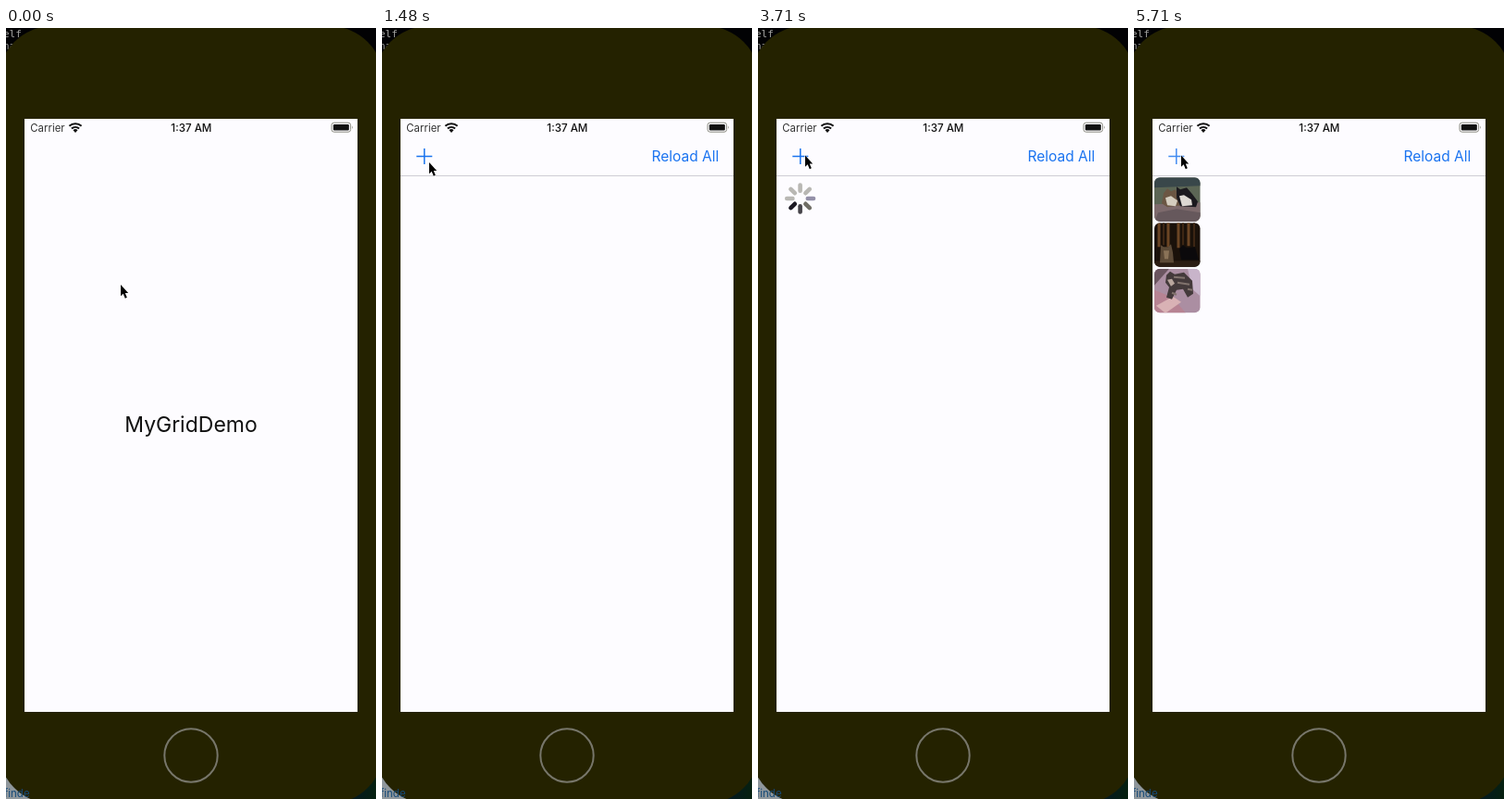
An HTML page that plays this animation: 400x832 px, repeating every 5730 ms.

```html
<!DOCTYPE html>
<html lang="en">
<head>
<meta charset="utf-8">
<title>Photo grid</title>
<style>
html, body { margin: 0; width: 100%; height: 100%; overflow: hidden; background: #020204; }
svg { display: block; width: 400px; height: 832px; font-family: Inter, Roboto, sans-serif; }
.mono { font: 11px "DejaVu Sans Mono", monospace; }
</style>
</head>
<body>
<svg viewBox="0 0 400 832">
  <defs>
    <clipPath id="cell"><rect width="49.5" height="47.5" rx="6"/></clipPath>
    <linearGradient id="corner"><stop stop-color="#03103a"/><stop offset="1" stop-color="#06200f"/></linearGradient>
  </defs>

  <!-- desktop behind the phone -->
  <rect width="400" height="832" fill="#020204"/>
  <rect y="790" width="60" height="42" fill="#8f979c"/>
  <rect x="340" y="790" width="60" height="42" fill="url(#corner)"/>
  <g class="mono" fill="#a3a3a0">
    <text x="-3" y="10">elf.s</text><text x="-3" y="23">nar</text><text x="-3" y="34">,</text>
  </g>

  <!-- phone -->
  <rect x="-8" y="-2" width="416" height="839" rx="58" fill="#242200"/>
  <text x="-2" y="830" font-size="11.5" fill="#164a78">finde</text>
  <circle cx="200" cy="785" r="28.7" fill="none" stroke="#77766a" stroke-width="2"/>
  <rect x="20" y="98" width="360" height="640" fill="#fdfcff"/>

  <!-- status bar -->
  <g fill="#111">
    <text x="26.3" y="112" font-size="11.4" fill="#333">Carrier</text>
    <text x="200.4" y="112" font-size="11.6" font-weight="500" text-anchor="middle">1:37 AM</text>
    <path d="M75 113l-2.5-2.7a3.6 3.6 0 0 1 5 0z"/>
    <path d="M70.9 108.5a6 6 0 0 1 8.2 0M68.4 105.8a9.6 9.6 0 0 1 13.2 0" fill="none" stroke="#111" stroke-width="2"/>
    <rect x="352" y="102.2" width="20.6" height="10" rx="2.6" fill="none" stroke="#8c8c82"/>
    <rect x="353.8" y="104" width="17" height="6.5" rx="1.2"/>
    <path d="M374 105.5q1.6 1.6 0 3.4z" fill="#8c8c82"/>
  </g>

  <g id="list">
    <path d="M20 159.5h360" stroke="#cfced4"/>
    <path id="plus" d="M37.3 138.5h17M45.8 130v17" stroke="#1a73ee" stroke-width="1.5"/>
    <text x="364.3" y="144" font-size="15.5" text-anchor="end" fill="#1a73f0">Reload All</text>
    <g transform="translate(22 161.2)"><g class="photo" clip-path="url(#cell)">
      <rect width="50" height="48" fill="#5c6655"/>
      <path d="M0 0h50v9L0 11z" fill="#39474a"/>
      <path d="M0 29l50-2v21H0z" fill="#7d6a6c"/>
      <path d="M4 38l20-4 26 4v10H0z" fill="#66585c"/>
      <path d="M10 17l4-5 4 3 5-2 3 8 3 9-15 2-6-4z" fill="#6b5643"/>
      <path d="M12 22l6-2 7 5-2 6-9-1z" fill="#d4cdbf"/>
      <path d="M24 10l4 3 7-2 6 7 6 8-2 6-17-1-4-9z" fill="#1b191e"/>
      <path d="M27 20l5-1 8 5 1 6-11 1z" fill="#ddd8d2"/>
    </g></g>
    <g transform="translate(22 210.2)"><g class="photo" clip-path="url(#cell)">
      <rect width="50" height="48" fill="#1a110a"/>
      <path d="M5 0v26M15 0v26M26 0v27M37 0v25" stroke="#6b4524" stroke-width="3"/>
      <path d="M10 0v24M31 0v24M43 0v26" stroke="#3d2614" stroke-width="2"/>
      <path d="M0 41h50v7H0z" fill="#2b1d13"/>
      <path d="M7 24l3 2h5l3-3 2 9 1 11H6z" fill="#5c4a37"/>
      <path d="M10 30h6l-1 9h-4z" fill="#8a7358"/>
      <path d="M27 28l4-4 4 3 9-1 4 14H29z" fill="#0b090b"/>
    </g></g>
    <g transform="translate(22 259.8)"><g class="photo" clip-path="url(#cell)">
      <rect width="50" height="48" fill="#ab8ea2"/>
      <path d="M0 0h16L0 18z" fill="#6b5560"/>
      <path d="M36 0h14v30l-9-8z" fill="#c8b4ca"/>
      <path d="M0 23l20 8 14 17H0z" fill="#b78393"/>
      <path d="M2 40l18-10 9 6-17 12z" fill="#d9b2b5"/>
      <path d="M13 7l4-4 5 3 10-2 9 9 1 14-6 4-5-9-7 1-5 10-6-2 3-11-4-5z" fill="#443a3b"/>
      <path d="M21 9l12 1M25 15l13 2M36 22l5 1M19 26l5 2" stroke="#81736d" stroke-width="2"/>
      <path d="M14 12l5-1 3 5-4 3z" fill="#b9a69d"/>
    </g></g>
    <g id="spinner" stroke-width="4.6" stroke-linecap="round"></g>
  </g>

  <g id="splash">
    <rect x="20" y="118" width="360" height="620" fill="#fdfcff"/>
    <text x="200" y="436" font-size="23" text-anchor="middle" fill="#111">MyGridDemo</text>
  </g>

  <path id="cursor" d="M0 0v12.2l2.7-2.5 2.1 5 2-.9-2-4.8h3.4z" fill="#000" stroke="#fff" stroke-width="1" paint-order="stroke"/>
</svg>
<script>
const LOOP = 5730, FADE = 250, HOLD = 120;
const $ = id => document.getElementById(id);
const photos = document.querySelectorAll(".photo");
const presses = [2780, 4420, 5400];
const loads = [[2880, 3900], [4500, 4800], [5500, 5620]];
const tones = ["#1c1a24", "#454349", "#706e66", "#9490a8", "#b9b8b4"];
const ease = (t, a, b) => {
  const p = Math.min(1, Math.max(0, (t - a) / (b - a)));
  return p * p * (3 - 2 * p);
};

for (let i = 0; i < 8; i++)
  $("spinner").innerHTML += `<path d="M0-8.2v-6.2" transform="rotate(${i * 45})"/>`;
const spokes = $("spinner").children;

function plusAlpha(t) {
  const start = presses.filter(p => p <= t).pop();
  if (start === undefined) return 1;
  return Math.min(1, 0.25 + 0.75 * Math.max(0, t - start - HOLD) / FADE);
}

function draw(t) {
  const launch = ease(t, 200, 420);
  $("splash").style.opacity = 1 - launch;
  $("list").style.opacity = launch;
  $("plus").style.opacity = plusAlpha(t);

  const move = ease(t, 880, 1400), nudge = ease(t, 1880, 2200);
  $("cursor").setAttribute("transform",
    `translate(${124 - 73 * move} ${277 - 132 * move - 7.5 * nudge})`);

  loads.forEach(([, done], i) => photos[i].style.display = t >= done ? "" : "none");
  const row = loads.findIndex(([from, done]) => t >= from && t < done);
  $("spinner").style.display = row < 0 ? "none" : "";
  $("spinner").setAttribute("transform", `translate(45.6 ${184 + 49 * row})`);
  const head = Math.floor(t / 125 + 7.65) % 8;
  for (let i = 0; i < 8; i++)
    spokes[i].setAttribute("stroke", tones[Math.min(4, (head - i + 8) % 8)]);
}

const begin = performance.now();
function tick() {
  draw((performance.now() - begin) % LOOP);
  requestAnimationFrame(tick);
}
tick();
</script>
</body>
</html>
```
